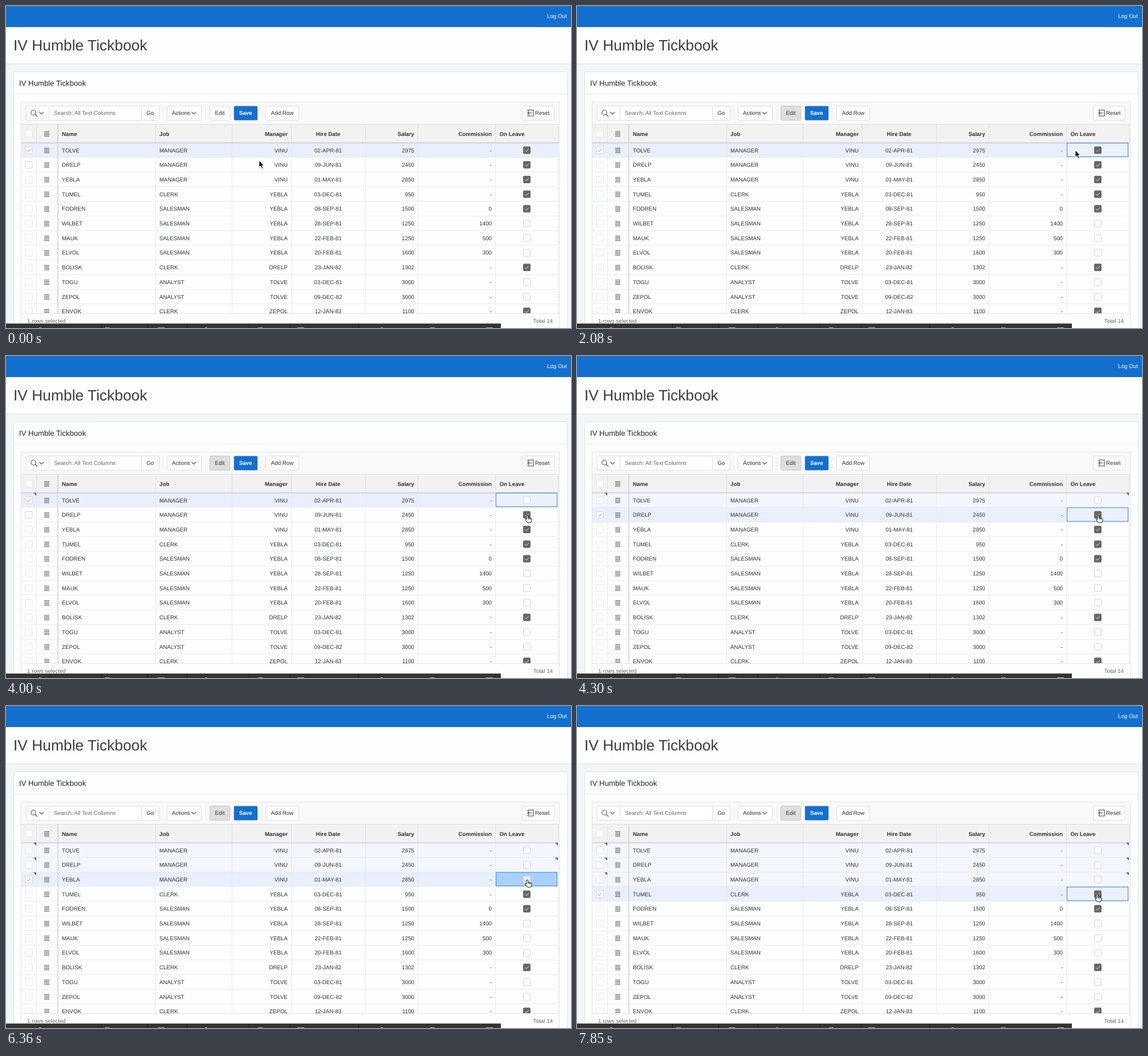
An HTML page for the animation above (8000 ms loop, 991x565 px).

```html
<!DOCTYPE html>
<html lang="en">
<head>
<meta charset="utf-8">
<title>Checkbox grid</title>
<style>
html, body { margin: 0; width: 100%; height: 100%; overflow: hidden; background: #fdfefe; }
svg { display: block; font-family: "Liberation Sans", Arial, sans-serif; font-size: 9.75px; text-rendering: geometricPrecision; }
</style>
</head>
<body>
<svg id="stage" width="991" height="565" viewBox="0 0 991 565"></svg>
<script>
const LOOP = 8000, BLUE = '#1470cf', INK = '#303030', TITLE = 'IV Humble Tickbook';

// name, job, manager, hire date, salary, commission, on leave
const people = `TOLVE MANAGER VINU 02-APR-81 2975 - 1
DRELP MANAGER VINU 09-JUN-81 2450 - 1
YEBLA MANAGER VINU 01-MAY-81 2850 - 1
TUMEL CLERK YEBLA 03-DEC-81 950 - 1
FODREN SALESMAN YEBLA 08-SEP-81 1500 0 1
WILBET SALESMAN YEBLA 28-SEP-81 1250 1400 0
MAUK SALESMAN YEBLA 22-FEB-81 1250 500 0
ELVOL SALESMAN YEBLA 20-FEB-81 1600 300 0
BOLISK CLERK DRELP 23-JAN-82 1302 - 1
TOGU ANALYST TOLVE 03-DEC-81 3000 - 0
ZEPOL ANALYST TOLVE 09-DEC-82 3000 - 0
ENVOK CLERK ZEPOL 12-JAN-83 1100 - 1`.split('\n').map(s => s.split(' '));

const columns = [
  ['Name', 98, 'start'], ['Job', 269, 'start'], ['Manager', 494, 'end'], ['Hire Date', 565, 'middle'],
  ['Salary', 716, 'end'], ['Commission', 852, 'end'], ['On Leave', 865.5, 'start']
];
const edges = [53, 262, 396, 500, 630, 722, 858, 968];

// Interaction times per row
const selectAt = [0, 4300, 5780, 7700];
const clearAt = [3120, 4890, 6210];
const clearedAt = [3420, 5340, 7700];
const FOCUS = 1630, EDIT = 2080;

// Pointer stops: time, x, y, 1 for a hand
const pointer = [
  [0, 444, 271, 0], [590, 456, 269, 0], [740, 530, 258, 0], [890, 672, 247, 0], [1040, 786, 246, 0],
  [1180, 853, 250, 0], [1330, 874, 253, 0], [2520, 885, 255, 0], [2670, 902, 257, 0], [2820, 907, 258, 1],
  [3560, 913, 262, 0], [3710, 915, 268, 0], [3850, 911, 276, 1], [4000, 910, 279, 1],
  [5340, 911, 283, 1], [5480, 915, 294, 0], [5630, 910, 304.5, 1],
  [6950, 911, 308, 1], [7100, 915, 317, 0], [7250, 909, 327, 1], [7400, 908, 330, 1]
];

const rect = (x, y, w, h, fill, stroke = 'none', r = 0) =>
  `<rect x="${x}" y="${y}" width="${w}" height="${h}" rx="${r}" fill="${fill}" stroke="${stroke}"/>`;
const path = (d, stroke, width = 1, fill = 'none') =>
  `<path d="${d}" fill="${fill}" stroke="${stroke}" stroke-width="${width}"/>`;
const text = (s, x, y, anchor = 'start', fill = INK, extra = '') =>
  `<text x="${x}" y="${y}" text-anchor="${anchor}" fill="${fill}" ${extra}>${s}</text>`;
const bold = 'font-weight="bold"';
const hline = (x, y, w, c) => rect(x, y, w, 1, c);
const vline = (x, y, h, c) => rect(x, y, 1, h, c);

const rowY = i => 240 + 25.75 * i;
const rowTop = i => Math.round(rowY(i));
const midY = i => 253 + 25.71 * i;

const tick = (x, y, c) => path(`M${x - 3.2} ${y + .2}l2.3 2.3 4.4 -4.7`, c, 1);
const box = (x, y, fill, stroke, mark) =>
  rect(x - 6, y - 6, 12, 12, fill, stroke, 1.5) + (mark ? tick(x, y, mark) : '');
const menu = y => [-4, -1.4, 1.2, 3.8].map(d => rect(67, y + d, 9, 1, '#4a4a4a')).join('');
const chevron = (x, y) => path(`M${x} ${y}l3.8 3.8 3.8 -3.8`, '#444', 1.1);
const corner = (x, y) => path(`M${x - 5} ${y}h5v5z`, 'none', 0, BLUE);
const button = (x, w, label, fill = '#fdfdfd', stroke = '#dedede') =>
  rect(x + .5, 175.5, w, 25, fill, stroke, 2) + text(label, x + w / 2 + .5, 191.3, 'middle');

function page() {
  return rect(0, 0, 991, 565, '#f1f6f9') + rect(0, 0, 991, 37, BLUE) +
    text('Log Out', 949, 21, 'start', '#fff') +
    rect(0, 37, 991, 64, '#fdfefe') + hline(0, 101, 991, '#e1e5e8') +
    text(TITLE, 13, 78, 'start', '#3c3c3c', 'font-size="26.4"') +
    rect(13.5, 115.5, 971, 460, '#fdfefe', '#dfe3e5', 2) +
    text(TITLE, 23, 140, 'start', '#222', 'font-size="13.2"') +
    hline(14, 154, 970, '#e6e8ea') +
    rect(26.5, 168.5, 944, 400, '#fdfefe', '#e3e3e3');
}

function toolbar(editing) {
  return rect(27, 169, 943, 39, '#f9f9f9') +
    [275, 350, 447].map(x => vline(x, 176, 24, '#efefef')).join('') +
    rect(35.5, 175.5, 202, 25, '#fff', '#dedede', 2) + vline(75, 176, 24, '#dedede') +
    '<circle cx="48" cy="187" r="4.2" fill="none" stroke="#444" stroke-width="1.1"/>' +
    path('M51 190l4.2 4.2', '#444', 1.2) + chevron(58.5, 186) +
    text('Search: All Text Columns', 84, 191.3, 'start', '#666') +
    button(237, 31, 'Go') +
    button(282, 60, '') + text('Actions', 291, 191.3) + chevron(325.5, 186) +
    (editing ? button(357, 35, 'Edit', '#dedede', '#c6c6c6') : button(357, 35, 'Edit')) +
    rect(399.8, 175.5, 41.4, 25, BLUE, 'none', 2) + text('Save', 420.3, 191.3, 'middle', '#fff', bold) +
    button(455, 58, 'Add Row') +
    button(905, 56, '') + text('Reset', 928, 191.3) +
    path('M915.5 185v-2.5h9.5v10.5h-9.5v-2.5M922.5 187.8h-7.5M917.8 185l-2.8 2.8 2.8 2.8', '#444', 1.1);
}

function heading() {
  return rect(27, 208, 943, 32, '#f2f2f2') + hline(27, 207, 943, '#dedede') +
    edges.map(x => vline(x, 208, 32, '#e0e0e0')).join('') + rect(90, 208, 2, 32, '#d6d6d6') +
    box(40, 224, '#fff', '#e2e2e2') + menu(224) +
    columns.map(([s, x, a]) => text(s, x, 227.6, a, '#303030', bold)).join('') +
    hline(27, 239, 942, '#d5d7de');
}

function leaveBox(i, t, y) {
  const on = people[i][6] === '1';
  if (!on) return box(913.5, y, '#fff', '#d2d2d2');
  if (t >= clearAt[i]) {
    const fill = t >= clearedAt[i] ? '#fff' : t >= clearAt[i] + 150 ? '#e6eaf0' : '#b0b3b8';
    return box(913.5, y, fill, '#d2d2d2');
  }
  const settling = (i === 0 && t >= EDIT && t < 2230) || (i === 1 && t >= 4300 && t < 4440);
  return box(913.5, y, '#666', '#666', settling ? '#b8b8b8' : '#eee');
}

function row(i, t, current, hover) {
  const top = rowTop(i), h = rowTop(i + 1) - top, y = midY(i);
  const selected = i === current, changed = t >= clearAt[i];
  const fill = selected ? '#eaeffd' : changed ? '#f3f6fc' : '#fdfefe';
  const fading = i === 0 && t >= 4300 && t < 4440;
  let out = rect(27, top, 942, h, fill) + hline(27, top + h - 1, 942, '#e9eaec') +
    edges.map(x => vline(x, top, h, '#e9eaec')).join('') + rect(90, top, 2, h, '#dcdcde');
  if (selected && t >= FOCUS) {
    const marked = i === 2 && changed;
    out += rect(859.5, rowY(i) + .4, 107, 24, marked ? '#a9d0fd' : '#eaf1fd', '#3d87d3');
  }
  out += box(40, y, changed && !selected ? '#fafcfe' : '#fff', selected || i === hover ? '#cfcfcf' : '#e4e4e4',
    selected ? '#858585' : fading ? '#d8d8d8' : '') + menu(y);
  out += columns.slice(0, 6).map(([, x, a], c) => text(people[i][c], x, y + 3.5, a)).join('');
  out += leaveBox(i, t, y);
  if (changed) out += corner(53, top) + (selected ? '' : corner(968, top));
  return out;
}

function footer() {
  const icons = [60, 178, 272, 351, 446, 517, 659, 748, 848];
  return rect(27, 539, 943, 26, '#fdfefe') + hline(27, 539, 943, '#e3e3e3') +
    text('1 rows selected', 37, 555.5, 'start', '#666') + text('Total 14', 959, 555.5, 'end', '#666') +
    rect(0, 557, 868, 8, '#353232') + hline(0, 557, 868, '#5b5858') +
    [167, 248, 317, 426, 498, 618].map(x => vline(x, 558, 7, '#1e1c1c')).join('') +
    icons.map((x, i) => rect(x - 2 - i % 3 * 2, 564, 4 + i % 3 * 4, 1, '#b9b7b7')).join('');
}

function cursor([, x, y, hand]) {
  const shape = hand
    ? path('M4 .6Q5.6 .4 5.8 2V5Q7.2 4.2 7.8 5.4Q9.2 4.7 9.8 6Q11.8 5.6 12 7.4V9.6L10.6 13.4H4.6L1 8.8Q.2 7.2 2 7L3 8V2Q3 .7 4 .6zM6 5.4V7.6M8 5.8V7.8M10 6.4V8', '#111', 1, '#fff')
    : path('M0 0V12L2.8 9.6 5 14.6 7 13.7 4.9 8.9H8.4z', '#fff', .8, '#111');
  return `<g transform="translate(${x} ${y})">${shape}</g>`;
}

function scene(t) {
  const at = pointer.findLast(p => p[0] <= t);
  const current = selectAt.findLastIndex(s => s <= t);
  const hover = Math.floor((at[2] - 240) / 25.75);
  const shadow = rect(27, 240, 942, 1.5, 'rgba(120,125,140,.18)');
  return page() + toolbar(t >= EDIT) + heading() +
    people.map((_, i) => row(i, t, current, hover)).join('') +
    shadow + footer() + cursor(at);
}

const stage = document.getElementById('stage');
let shown = '';
function draw() {
  const next = scene(performance.now() % LOOP);
  if (next !== shown) stage.innerHTML = shown = next;
  requestAnimationFrame(draw);
}
draw();
</script>
</body>
</html>
```
